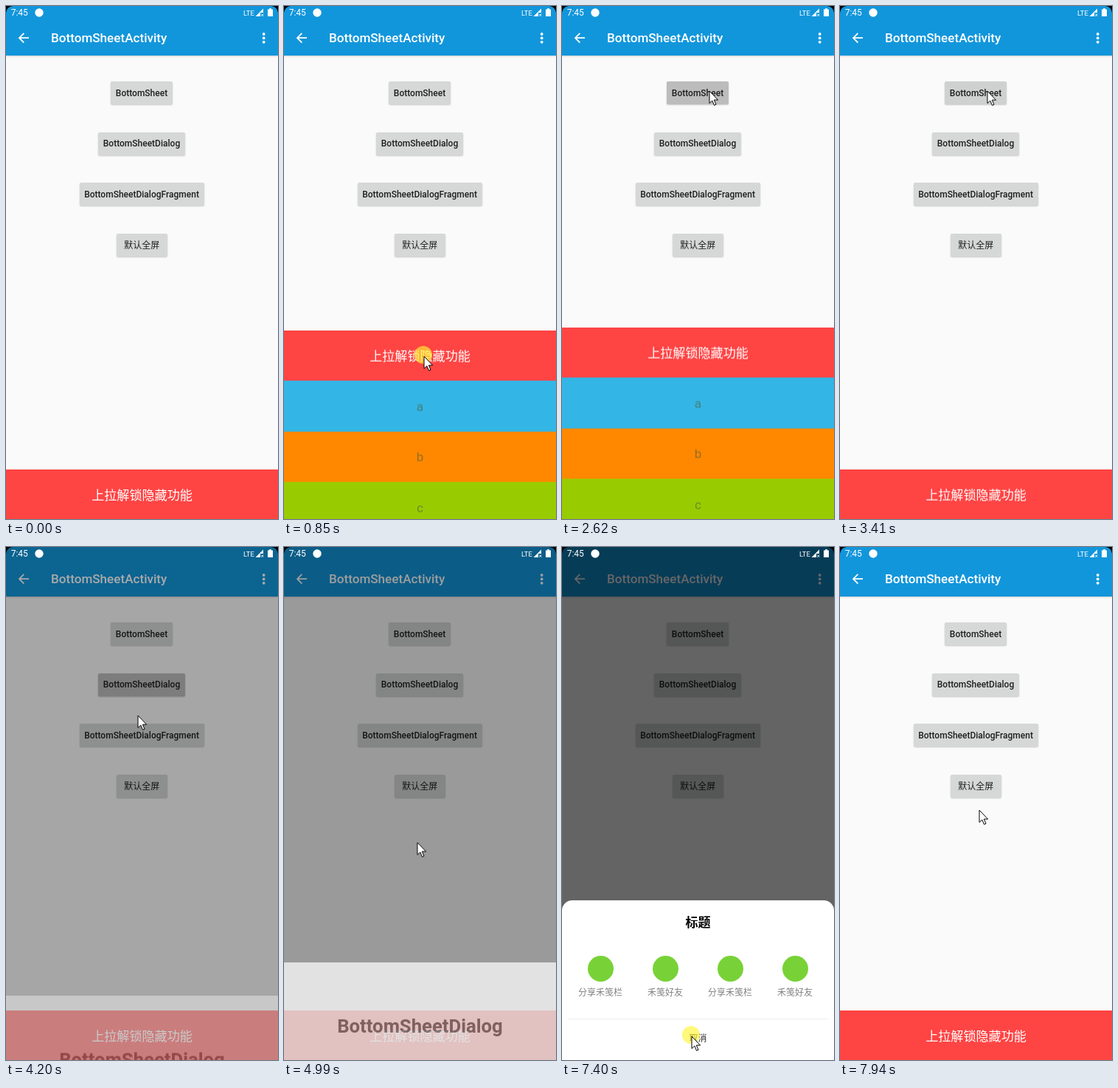
Write an HTML page that moves like this. It is 369 px wide and 694 px high and loops after 8 s.

```html
<!DOCTYPE html>
<html lang="zh-CN">
<head>
<meta charset="utf-8">
<title>BottomSheetActivity</title>
<style>
html, body { margin: 0; width: 100%; height: 100%; overflow: hidden; }
body { font: 12px Roboto, "Noto Sans CJK SC", "Noto Sans CJK", sans-serif; }
#stage { position: relative; width: 369px; height: 694px; overflow: hidden; background: #fafafa; }
#stage * { box-sizing: border-box; }
#stage > * { position: absolute; }
.mid { display: flex; align-items: center; justify-content: center; white-space: nowrap; }
.loop { animation: 8s linear infinite both; }

.bar { left: 0; top: 0; width: 369px; height: 67px; background: #1296db; box-shadow: 0 1px 2px rgba(0,0,0,.2); }
.bar b { position: absolute; left: 61px; top: 33px; line-height: 21px; font-size: 17.1px; font-weight: 500; color: #fff; }
.bar svg, .status { position: absolute; left: 0; top: 0; }

.btn { height: 31px; border-radius: 2px; background: #d6d7d7; color: #1f1f1f; font-weight: 500; box-shadow: 0 1px 2px rgba(0,0,0,.2); overflow: hidden; }
.btn span { position: relative; }
.btn.plain { font-weight: 300; padding-bottom: 1px; }
.btn i { position: absolute; left: calc(var(--x) - var(--r)); top: calc(var(--y) - var(--r)); width: calc(2 * var(--r)); height: calc(2 * var(--r)); border-radius: 50%; background: rgba(0,0,0,.12); animation-name: var(--ripple); animation-timing-function: ease-out; }

.sheet { left: 0; top: 627px; width: 369px; animation-name: sheet; }
.sheet div { height: 68px; font-size: 17.1px; color: rgba(80,95,60,.6); }
.sheet div:nth-child(even) { height: 69px; }
.sheet div:first-child { padding-bottom: 1px; background: #f44; color: #fff; }

.dim { inset: 0; background: rgba(0,0,0,.6); animation-name: dim; }
.pop { left: 0; width: 369px; background: #fff; animation-timing-function: cubic-bezier(.37,0,.63,1); }
.dialog { top: 522px; height: 172px; padding-bottom: 1px; font-size: 25.7px; font-weight: 700; color: #757575; animation-name: dialog; }
.share { top: 478px; height: 216px; border-radius: 14px 14px 0 0; animation-name: share; }
.share > * { position: absolute; }
.title { left: 0; top: 16px; width: 100%; height: 24px; font-size: 17.1px; font-weight: 700; color: #000; }
.app { top: 75px; width: 88px; height: 60px; font-weight: 300; color: #808080; }
.app i { position: absolute; left: 26.5px; top: 0; width: 35px; height: 35px; border-radius: 50%; background: #78d237; }
.app span { position: absolute; top: 41px; line-height: 18px; }
.rule { left: 9px; right: 9px; top: 160px; height: 1px; background: #ececec; }
.cancel { left: 0; top: 175px; width: 100%; height: 20px; color: #333; }

.cursor { left: 0; top: 0; animation-name: cursor; animation-timing-function: ease-in-out; }
.cursor i { position: absolute; left: -12px; top: -13px; width: 24px; height: 24px; border-radius: 50%; background: rgba(255,244,50,.65); animation-name: press; animation-timing-function: step-end; }
.cursor svg { position: absolute; left: -.5px; top: -.5px; }

@keyframes sheet {
  0% { transform: none; }
  6% { transform: none; animation-timing-function: ease-in-out; }
  11.5% { transform: translateY(-198px); animation-timing-function: ease-out; }
  12.5% { transform: translateY(-207px); }
  15.6% { transform: translateY(-207px); animation-timing-function: ease-in-out; }
  19.375% { transform: translateY(-25px); animation-timing-function: ease-out; }
  20.8% { transform: none; }
  30.25% { transform: none; animation-timing-function: cubic-bezier(.22,1,.36,1); }
  36.2% { transform: translateY(-207px); }
  38.125% { transform: translateY(-207px); animation-timing-function: cubic-bezier(.22,1,.36,1); }
  43.75%, 100% { transform: none; }
}
@keyframes dim {
  0%, 50.75%, 64.4%, 76.5%, 96.5%, 100% { opacity: 0; }
  53.875%, 61.25%, 79.6%, 93.75% { opacity: 1; }
}
@keyframes dialog {
  0%, 51.18%, 64.4%, 100% { opacity: 0; transform: translateY(139px); }
  54.3%, 61.25% { opacity: 1; transform: none; }
}
@keyframes share {
  0%, 76.9%, 96.9%, 100% { opacity: 0; transform: translateY(139px); }
  80%, 93.75% { opacity: 1; transform: none; }
}
@keyframes ripple1 {
  0%, 28.75% { transform: scale(0); opacity: 1; }
  32%, 33.2% { transform: none; opacity: 1; }
  36%, 37.2% { transform: none; opacity: 0; }
  37.25% { transform: scale(0); opacity: 1; }
  40.5%, 41% { transform: none; opacity: 1; }
  44%, 100% { transform: none; opacity: 0; }
}
@keyframes ripple2 {
  0%, 48.625% { transform: scale(0); opacity: 1; }
  52%, 53% { transform: none; opacity: 1; }
  56%, 100% { transform: none; opacity: 0; }
}
@keyframes ripple3 {
  0%, 73.125% { transform: scale(0); opacity: 1; }
  76.9%, 77.6% { transform: none; opacity: 1; }
  81%, 100% { transform: none; opacity: 0; }
}
@keyframes cursor {
  0%, 1.6% { transform: translate(196px,704px); }
  5.5%, 6% { transform: translate(189px,663px); }
  11.5% { transform: translate(189px,463px); }
  13.5% { transform: translate(190px,397px); }
  15%, 15.6% { transform: translate(189px,459px); }
  19.375%, 23.5% { transform: translate(189px,641px); }
  28.5%, 42.5% { transform: translate(199px,114px); }
  46.5%, 50.5% { transform: translate(187px,187px); animation-timing-function: linear; }
  52.5% { transform: translate(178px,226px); animation-timing-function: ease-out; }
  56%, 62% { transform: translate(180px,400px); }
  68%, 69.4% { transform: translate(170px,253px); }
  71.25%, 77% { transform: translate(169px,256px); }
  82.5%, 83.2% { transform: translate(223px,478px); }
  90.3%, 94% { transform: translate(175px,661px); }
  99%, 100% { transform: translate(188px,355px); }
}
@keyframes press {
  0%, 12.5%, 18.75%, 30.25%, 38.5%, 50%, 61.25%, 74.75%, 93.75%, 100% { opacity: 0; }
  6%, 15%, 28.75%, 37.25%, 48.625%, 60%, 73.125%, 92.44% { opacity: 1; }
}
</style>
</head>
<body>
<div id="stage">
  <div class="bar">
    <b>BottomSheetActivity</b>
    <svg width="369" height="67" fill="#fff">
      <path d="M31 43.2H18.5M24.3 36.8 18 43.2l6.3 6.4" fill="none" stroke="#fff" stroke-width="1.8"/>
      <circle cx="349.7" cy="38" r="1.9"/><circle cx="349.7" cy="43.4" r="1.9"/><circle cx="349.7" cy="48.8" r="1.9"/>
    </svg>
  </div>

  <div class="btn mid" style="left:142px;top:102.4px;width:84px;--x:57px;--y:12px;--r:70px;--ripple:ripple1"><i class="loop"></i><span>BottomSheet</span></div>
  <div class="btn mid" style="left:125px;top:170.8px;width:118px;--x:62px;--y:16px;--r:75px;--ripple:ripple2"><i class="loop"></i><span>BottomSheetDialog</span></div>
  <div class="btn mid" style="left:99.5px;top:239.2px;width:169px;--x:70px;--y:17px;--r:105px;--ripple:ripple3"><i class="loop"></i><span>BottomSheetDialogFragment</span></div>
  <div class="btn mid plain" style="left:150px;top:307.6px;width:68.5px"><span>默认全屏</span></div>

  <div class="sheet loop">
    <div class="mid">上拉解锁隐藏功能</div>
    <div class="mid" style="background:#33b5e5">a</div>
    <div class="mid" style="background:#f80">b</div>
    <div class="mid" style="background:#9c0">c</div>
  </div>

  <div class="dim loop"></div>
  <div class="pop dialog mid loop">BottomSheetDialog</div>
  <div class="pop share loop">
    <div class="title mid">标题</div>
    <div class="app mid" style="left:8px"><i></i><span>分享禾笺栏</span></div>
    <div class="app mid" style="left:96px"><i></i><span>禾笺好友</span></div>
    <div class="app mid" style="left:184px"><i></i><span>分享禾笺栏</span></div>
    <div class="app mid" style="left:272px"><i></i><span>禾笺好友</span></div>
    <div class="rule"></div>
    <div class="cancel mid">取消</div>
  </div>

  <svg class="status" width="369" height="20" fill="#fff">
    <path d="M0 0H9Q1 1 0 9ZM369 0H360Q368 1 369 9Z" fill="#000"/>
    <text x="6.7" y="13.3" font-size="12">7:45</text>
    <circle cx="45" cy="9" r="5.7"/>
    <text x="322" y="12.8" font-size="9.5">LTE</text>
    <path d="M349 3.5V9H345V14H338.5Z"/>
    <path d="M346.2 10.6 349.2 13.8M349.2 10.6 346.2 13.8" stroke="#fff"/>
    <path d="M355 4.5H357V3.3H360V4.5H362V14H355Z"/>
  </svg>

  <div class="cursor loop">
    <i class="loop"></i>
    <svg width="15" height="23"><path d="M1 1V17.5L4.8 14 7.5 20.3 10 19.2 7.3 13.1H12.6Z" fill="#fff" stroke="#000" stroke-linejoin="round"/></svg>
  </div>
</div>
</body>
</html>
```
